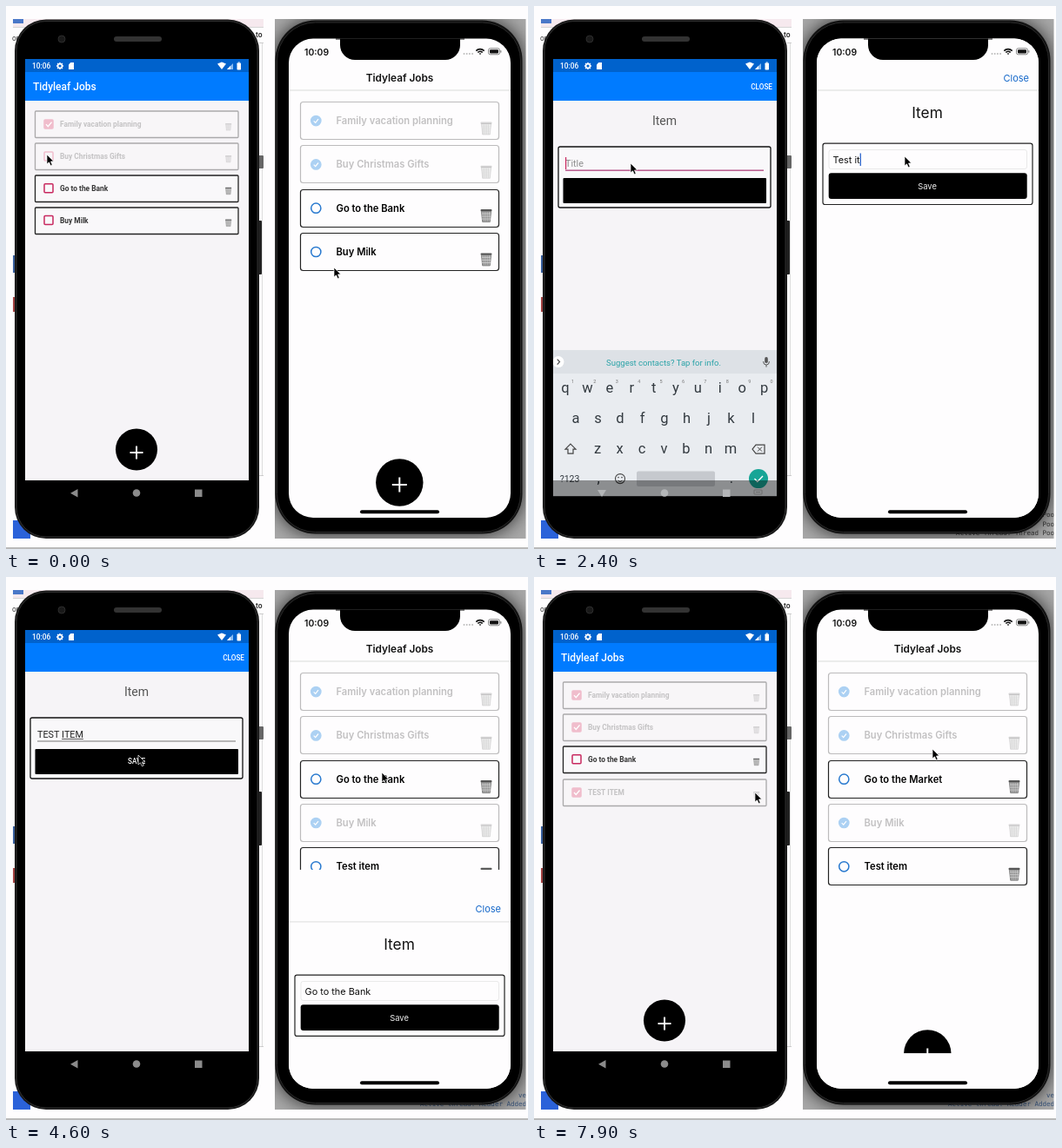
Animation of 600 by 625 pixels, one loop 8000 ms. Source, as an HTML page with a canvas:

```html
<!DOCTYPE html>
<html lang="en">
<head>
<meta charset="utf-8">
<title>Two to-do apps</title>
<style>
html, body { margin: 0; height: 100%; overflow: hidden; background: #fefdfe }
canvas { display: block; width: 600px; height: 625px }
</style>
</head>
<body>
<canvas id="stage"></canvas>
<script>
const LOOP = 8000, STEP = 100;
const TITLE = 'Tidyleaf Jobs';
const ROBOTO = 'Roboto, sans-serif', INTER = 'Inter, sans-serif', MONO = '"DejaVu Sans Mono", monospace';
const BLUE = '#007bff', PINK = '#c8285f', GREY = '#8b8b8b', LINK = '#1467c9', PAPER = '#f6f4f7';
const FORM_HEIGHT = 470, SHEET_HEIGHT = 552, KEYS_HEIGHT = 168;
const stage = document.getElementById('stage');
const ratio = window.devicePixelRatio || 1;
stage.width = 600 * ratio;
stage.height = 625 * ratio;
const c = stage.getContext('2d');

// Drawing helpers
function rect(x, y, w, h, fill) {
  c.fillStyle = fill;
  c.fillRect(x, y, w, h);
}
function box(x, y, w, h, r, fill, stroke, width = 1) {
  c.beginPath();
  c.roundRect(x, y, w, h, r);
  paint(fill, stroke, width);
}
function disc(x, y, r, fill, stroke, width = 1) {
  c.beginPath();
  c.arc(x, y, r, 0, 7);
  paint(fill, stroke, width);
}
function shape(points, fill, stroke, width = 1, close = true) {
  c.beginPath();
  for (let i = 0; i < points.length; i += 2) c.lineTo(points[i], points[i + 1]);
  if (close) c.closePath();
  paint(fill, stroke, width);
}
function paint(fill, stroke, width) {
  if (fill) { c.fillStyle = fill; c.fill(); }
  if (stroke) { c.strokeStyle = stroke; c.lineWidth = width; c.stroke(); }
}
function line(points, color, width = 1) { shape(points, null, color, width, false); }
function text(str, x, y, size, font, color, align = 'left', weight = 400) {
  c.font = `${weight} ${size}px ${font}`;
  c.textAlign = align;
  c.fillStyle = color;
  c.fillText(str, x, y);
  return c.measureText(str).width;
}
function layer(draw, dx = 0, dy = 0, alpha = 1) {
  c.save();
  c.translate(dx, dy);
  c.globalAlpha *= alpha;
  draw();
  c.restore();
}
function plus(x, y, r, py, arm) {
  disc(x, y, r, '#000');
  line([x - arm, py, x + arm, py], '#fff', 2);
  line([x, py - arm, x, py + arm], '#fff', 2);
}
function trash(x, y, k) {
  layer(() => {
    c.scale(k, k);
    shape([.8, 2, 12.2, 2, 10.8, 14.5, 2.2, 14.5], '#b0b0b0', '#777', .8);
    for (let i = 3; i < 11; i += 2) line([i, 3, i, 14], '#7c7c7c', .6);
    for (let i = 5; i < 14; i += 3) line([1.5, i, 11.5, i], '#d8d8d8', .7);
    box(0, 0, 13, 2.2, 1, '#555');
  }, x, y);
}
function pointer(x, y) {
  shape([0, 0, 0, 11, 2.5, 8.8, 4.3, 12.8, 6.2, 12, 4.5, 8, 7.8, 7.8].map((v, i) => v + (i % 2 ? y : x)),
    '#000', '#fff', .7);
}

// Motion helpers
const clamp = v => Math.max(0, Math.min(1, v));
const easeOut = (t, start, length) => 1 - (1 - clamp((t - start) / length)) ** 3;
const count = (t, start, step, max) => Math.max(0, Math.min(max, Math.floor((t - start) / step)));
function track(keys, t) {
  let i = 1;
  while (i < keys.length - 1 && keys[i][0] < t) i++;
  const [a, ax, ay] = keys[i - 1], [b, bx, by] = keys[i];
  const p = clamp((t - a) / (b - a)), s = p * p * (3 - 2 * p);
  return [ax + (bx - ax) * s, ay + (by - ay) * s];
}
const leftPath = [[0, 47, 171], [300, 47, 171], [1000, 154, 505], [1700, 154, 505], [2150, 111, 181],
  [3000, 111, 181], [3700, 148, 197], [4400, 150, 203], [4800, 154, 207], [5300, 154, 207],
  [6000, 50, 282], [6500, 50, 282], [7400, 254, 248], [8000, 254, 248]];
const rightPath = [[0, 377, 301], [450, 451, 545], [800, 451, 545], [1350, 426, 173], [2600, 426, 173],
  [2950, 446, 205], [3300, 446, 205], [3900, 352, 285], [4100, 352, 285], [4450, 432, 225],
  [5000, 432, 225], [5400, 450, 171], [7100, 450, 171], [7450, 458, 198], [8000, 458, 198]];

// Left phone
function leftBody() {
  rect(8, 15, 288, 9, '#f6e9ee');
  rect(8, 15, 12, 5, '#4a78c8');
  rect(8, 24, 288, 1, '#d5d5d5');
  text('or', 7, 40, 8, INTER, '#333');
  text('to', 287, 36, 8, INTER, '#222', 'left', 600);
  line([291, 42.5, 296, 42.5], '#ccc');
  line([294.5, 43, 294.5, 540], '#ddd');
  line([285, 540.5, 296, 540.5], '#ccc');
  rect(8, 287, 4, 20, '#3b62a0');
  rect(8, 335, 4, 17, '#a54444');
  rect(8, 592, 20, 21, '#2b62d9');
  box(290, 172, 6, 15, 1, '#666');
  box(290, 247, 4, 62, 1, '#222');
  box(10, 15.5, 281, 597.5, 36, '#171717');
  box(12, 17.5, 277, 593.5, 34, '#000', '#303030', 1);
  disc(64, 38, 4, '#191919', '#2c2c2c');
  box(124, 35, 55, 6, 3, '#333');
}
function leftRow(label, y, done, ticked = done) {
  layer(() => box(33.5, Math.round(y), 233.5, 30.5, 1, '#f9f8fa', '#222', 1.3), 0, 0, done ? .36 : 1);
  layer(() => {
    text(label, 62, y + 18, 8.4, ROBOTO, '#222', 'left', 700);
  }, 0, 0, done ? .24 : .9);
  layer(() => trash(252, y + 14, .56), 0, 0, done ? .2 : .8);
  const color = done ? '#f0bdcc' : PINK;
  box(44, y + 10, 10, 10, 1, ticked ? color : null, color, 1.5);
  if (ticked) line([46, y + 15, 48.3, y + 17.5, 52.5, y + 12.5], '#fff', 1.4);
}
function leftList(t) {
  const pitch = 36.8, row = i => 121.1 + i * pitch;
  rect(22, 76, 257, 470, PAPER);
  rect(22, 76, 257, 33, BLUE);
  text(TITLE, 31, 97, 12, ROBOTO, '#fff', 'left', 500);
  leftRow('Family vacation planning', row(0), true);
  leftRow('Buy Christmas Gifts', row(1), true, t >= 100);
  leftRow('Go to the Bank', row(2), false);
  if (t < 7700) leftRow('Buy Milk', row(3), false);
  if (t >= 4600) leftRow('TEST ITEM', row(4) - pitch * easeOut(t, 7704, 300), t >= 6300);
  plus(150, 510.5, 24, 514, 7.5);
}
function leftForm(typed, focused) {
  rect(22, 76, 257, FORM_HEIGHT, PAPER);
  rect(22, 76, 257, 33, BLUE);
  text('CLOSE', 274, 96, 8.2, ROBOTO, '#fff', 'right', 500);
  text('Item', 150, 136.5, 14, ROBOTO, '#555', 'center');
  box(28, 162, 244, 70, 2, '#f9f8fa', '#111', 1.3);
  const w = text(typed || 'Title', 36, 185, 10.8, ROBOTO, typed ? '#222' : '#8d8d8d');
  rect(36, 188.5, 228, focused ? 1.4 : 1, focused ? '#b55088' : '#777');
  if (typed) {
    const word = typed.split(' ').pop(), ww = c.measureText(word).width;
    rect(36 + w - ww, 186, ww, .8, '#333');
  }
  if (focused) rect(36 + (typed ? w : 0), 174, 1.2, 14, PINK);
  box(33.5, 198, 233.5, 29, 1, '#000');
  if (typed) text('SAVE', 150, 215, 8.2, ROBOTO, '#fff', 'center', 500);
}
function keyboard(typed) {
  const ink = '#333a40', key = (k, x, y) => text(k, x, y, 16.5, ROBOTO, ink, 'center');
  rect(22, 378, 257, KEYS_HEIGHT, '#e9ecf0');
  rect(22, 378, 257, 27, '#dde1e6');
  disc(28, 391.5, 6.5, '#fff');
  line([26.7, 388.5, 29.5, 391.5, 26.7, 394.5], '#444', 1.2);
  if (typed) {
    const word = typed.split(' ').pop();
    const hints = word[0] === 'I' ? ['IT', 'ITEMS'] : ['TEST', 'TESTS'];
    [word, ...hints].forEach((h, i) => text(h, 77 + 72 * i, 395, 9.5, ROBOTO, '#666c72', 'center'));
    [112.5, 185.5].forEach(x => line([x, 385, x, 398], '#c2c7cc'));
  } else {
    text('Suggest contacts? Tap for info.', 149, 395.5, 9.5, ROBOTO, '#2aa3a8', 'center');
  }
  box(265.2, 386, 3.6, 7, 1.8, '#555');
  line([263.5, 391, 264.5, 394, 267, 395, 269.5, 394, 270.5, 391], '#555');
  line([267, 395, 267, 397.5], '#555');
  [...'qwertyuiop'].forEach((k, i) => {
    key(k, 36 + 25.4 * i, 427);
    text((i + 1) % 10, 44.5 + 25.4 * i, 416, 5.5, ROBOTO, '#777', 'center');
  });
  [...'asdfghjkl'].forEach((k, i) => key(k, 48 + 25.5 * i, 462));
  [...'zxcvbnm'].forEach((k, i) => key(k, 73 + 25.5 * i, 497));
  shape([42, 486, 48, 492, 45, 492, 45, 497, 39, 497, 39, 492, 36, 492], null, '#444', 1.2);
  shape([251, 492, 255, 487, 265, 487, 265, 497, 255, 497], null, '#444', 1.2);
  line([257, 489.5, 262, 494.5], '#444');
  line([262, 489.5, 257, 494.5], '#444');
  text('?123', 41, 530, 10.5, ROBOTO, ink, 'center');
  key(',', 74, 531);
  key('.', 227, 531);
  disc(99, 526, 5.5, null, '#444', 1.1);
  disc(97, 524.5, .8, '#444');
  disc(101, 524.5, .8, '#444');
  line([96.5, 528, 99, 529.5, 101.5, 528], '#444');
  box(118, 517.5, 90, 17.5, 2, '#c6c9ce');
  disc(258, 526, 11, '#17a596');
  line([253.5, 526, 256.8, 529.3, 263, 522.8], '#fff', 1.4);
}
function leftStatus() {
  rect(22, 61, 257, 15, '#0062cc');
  text('10:06', 30, 72, 8.4, ROBOTO, '#fff', 'left', 500);
  for (let i = 0; i < 4; i++) {
    const a = i * Math.PI / 4, x = 4 * Math.cos(a), y = 4 * Math.sin(a);
    line([62 - x, 69 - y, 62 + x, 69 + y], '#fff', 1.6);
  }
  disc(62, 69, 2.3, '#0062cc', '#fff', 1.5);
  shape([72, 67.5, 74.3, 65, 78, 65, 78, 73, 72, 73], '#fff');
  shape([243, 66.5, 248, 64.5, 253, 66.5, 248, 73], '#fff');
  shape([254, 73, 261, 66, 261, 73], '#8bbcf0');
  shape([254, 73, 258, 69, 258, 73], '#fff');
  box(265.5, 65.5, 4.5, 8, .7, '#fff');
  rect(266.7, 64.5, 2, 1, '#fff');
}
function leftPhone(t) {
  const typed = 'TEST ITEM'.slice(0, count(t, 2800, 150, 9));
  const focused = t >= 2200 && t < 4600;
  const formDrop = FORM_HEIGHT * (1 - easeOut(t, 1351, 400) + easeOut(t, 4688, 300));
  const keysDrop = KEYS_HEIGHT * (1 - easeOut(t, 2269, 250) + easeOut(t, 4400, 200));
  leftBody();
  c.save();
  c.beginPath();
  c.rect(22, 61, 257, 485);
  c.clip();
  leftList(t);
  if (formDrop < FORM_HEIGHT) layer(() => leftForm(typed, focused), 0, formDrop);
  leftStatus();
  c.restore();
  if (keysDrop < KEYS_HEIGHT) {
    c.save();
    c.beginPath();
    c.rect(22, 61, 257, 504);
    c.clip();
    layer(() => keyboard(typed), 0, keysDrop);
    rect(22, 546, 257, Math.min(19, keysDrop), 'rgba(0,0,0,.4)');
    c.restore();
    const icon = keysDrop > 1 ? '#b4b6b8' : GREY;
    shape([73, 557, 83, 557, 78, 565], icon);
    box(253, 557, 9, 5, .5, null, '#666', .8);
    line([255, 559.5, 260, 559.5], '#666', .8);
    disc(150, 560.5, 4.3, icon);
    rect(217, 556.5, 8.5, 8.5, icon);
  } else {
    shape([82.5, 556, 82.5, 565.5, 74, 560.7], GREY);
    disc(150, 560.5, 4.3, GREY);
    rect(217, 556.5, 8.5, 8.5, GREY);
  }
  pointer(...track(leftPath, t));
}

// Right phone
function rightBody(t) {
  c.save();
  c.beginPath();
  c.rect(309, 15, 288.5, 598);
  c.clip();
  rect(309, 15, 289, 598, '#a8a8a8');
  if (t >= 1000) {
    const log = t < 4600 ? ['Poo', 'Poo', 'Active Thread: Thread Poo']
      : ['', 've', 'Active thread: Reader Added'];
    log.forEach((s, i) => text(s, 598, 588 + 10.5 * i, 7.5, MONO, t < 4600 ? '#333' : '#345078', 'right'));
  }
  c.shadowColor = 'rgba(0,0,0,.75)';
  c.shadowBlur = 20 * ratio;
  box(309.5, 16.5, 284, 591, 46, '#111');
  c.shadowColor = 'transparent';
  box(311.5, 19, 280, 586.5, 44, '#000', '#2a2a2a', 1);
  c.restore();
}
function rightRow(label, y, done) {
  const top = Math.floor(y) + .5;
  layer(() => box(338.5, top, 228, 43, 3, null, '#222', 1.2), 0, 0, done ? .3 : 1);
  layer(() => {
    text(label, 379.5, y + 25.5, 11.2, INTER, '#000', 'left', 600);
    trash(545.5, y + 23, 1);
  }, 0, 0, done ? .24 : 1);
  const color = done ? '#acd1f3' : '#2879cf';
  disc(356.3, y + 21.6, 5.6, done ? color : null, color, 1.5);
  if (done) line([353.7, y + 21.8, 355.7, y + 23.8, 359, y + 19.7], '#fff', 1.2);
}
function rightList(t) {
  const row = i => 110.5 + i * 50.3;
  text(TITLE, 452.5, 86.5, 11.8, INTER, '#111', 'center', 600);
  rect(324, 96.5, 257, 1, '#dcdcdc');
  rightRow('Family vacation planning', row(0), true);
  rightRow('Buy Christmas Gifts', row(1), true);
  rightRow(t < 7500 ? 'Go to the Bank' : 'Go to the Market', row(2), false);
  rightRow('Buy Milk', row(3), t >= 4100);
  if (t >= 3000) rightRow('Test item', row(4), false);
  plus(452.3, 548.5, 27.2, 551, 8.5);
}
function rightForm(typed, focused) {
  rect(324, 37, 257, SHEET_HEIGHT, '#fefdfe');
  text('Close', 569, 86.5, 11, INTER, LINK, 'right');
  rect(324, 96.5, 257, 1, '#dcdcdc');
  text('Item', 452, 129, 17.3, INTER, '#111', 'center');
  box(332, 158.2, 241, 70.3, 2.5, null, '#222', 1.2);
  box(339, 165.5, 227.5, 22, 2.5, null, '#e9e9e9', 1);
  const w = text(typed || 'Title', 343.5, 181, 10.9, INTER, typed ? '#111' : '#999');
  if (focused) rect(343.5 + (typed ? w : 0), 169.5, 1.4, 14.5, '#3a6fd0');
  box(338.7, 192.3, 228, 29.7, 3, '#000');
  text('Save', 452, 210.7, 9.4, INTER, typed ? '#eee' : '#333', 'center');
}
function rightStatus() {
  box(379, 30, 148, 8.5, 0, '#000');
  box(384, 30, 138, 32, [0, 0, 17, 17], '#000');
  text('10:09', 343, 56.5, 10.4, INTER, '#111', 'left', 600);
  for (let i = 0; i < 4; i++) disc(526.5 + 3.2 * i, 55, 1, '#bbb');
  for (let i = 0; i < 3; i++) {
    c.beginPath();
    c.arc(545, 56, 1 + i * 2.7, -Math.PI * .76, -Math.PI * .24);
    paint(null, '#111', 1.7);
  }
  box(554.5, 48.8, 13, 7, 2, null, '#777', .9);
  box(556, 50.2, 10, 4.2, 1, '#111');
  rect(568.4, 51.2, 1, 2.4, '#777');
  box(407, 580.2, 91, 4, 2, '#000');
}
function rightPhone(t) {
  const first = t < 3800;
  const drop = SHEET_HEIGHT * (first
    ? 1 - easeOut(t, 500, 500) + easeOut(t, 3000, 500)
    : 1 - easeOut(t, 4508, 500) + easeOut(t, 7610, 500));
  const typed = first ? 'Test item'.slice(0, count(t, 1650, 105, 9))
    : 'Go to the Bank'.slice(0, 14 - count(t, 5750, 140, 4)) + 'Market'.slice(0, count(t, 6400, 110, 6));
  const focused = first ? t >= 1400 && t < 3000 : t >= 5450 && t < 7600;
  rightBody(t);
  c.save();
  c.beginPath();
  c.roundRect(325, 37.5, 255, 551.5, 28);
  c.clip();
  rect(324, 37, 257, SHEET_HEIGHT, '#fefdfe');
  rightList(t);
  if (drop < SHEET_HEIGHT) layer(() => rightForm(typed, focused), 0, drop);
  rightStatus();
  c.restore();
  pointer(...track(rightPath, t));
}

function draw(now) {
  const t = Math.floor(now / STEP) * STEP % LOOP;
  c.setTransform(ratio, 0, 0, ratio, 0, 0);
  rect(0, 0, 600, 625, '#fefdfe');
  rect(0, 623.5, 600, 1, '#777');
  leftPhone(t);
  rightPhone(t);
  requestAnimationFrame(frame);
}
let begin;
function frame(now) {
  begin ??= now;
  draw(now - begin);
}
requestAnimationFrame(frame);
</script>
</body>
</html>
```
